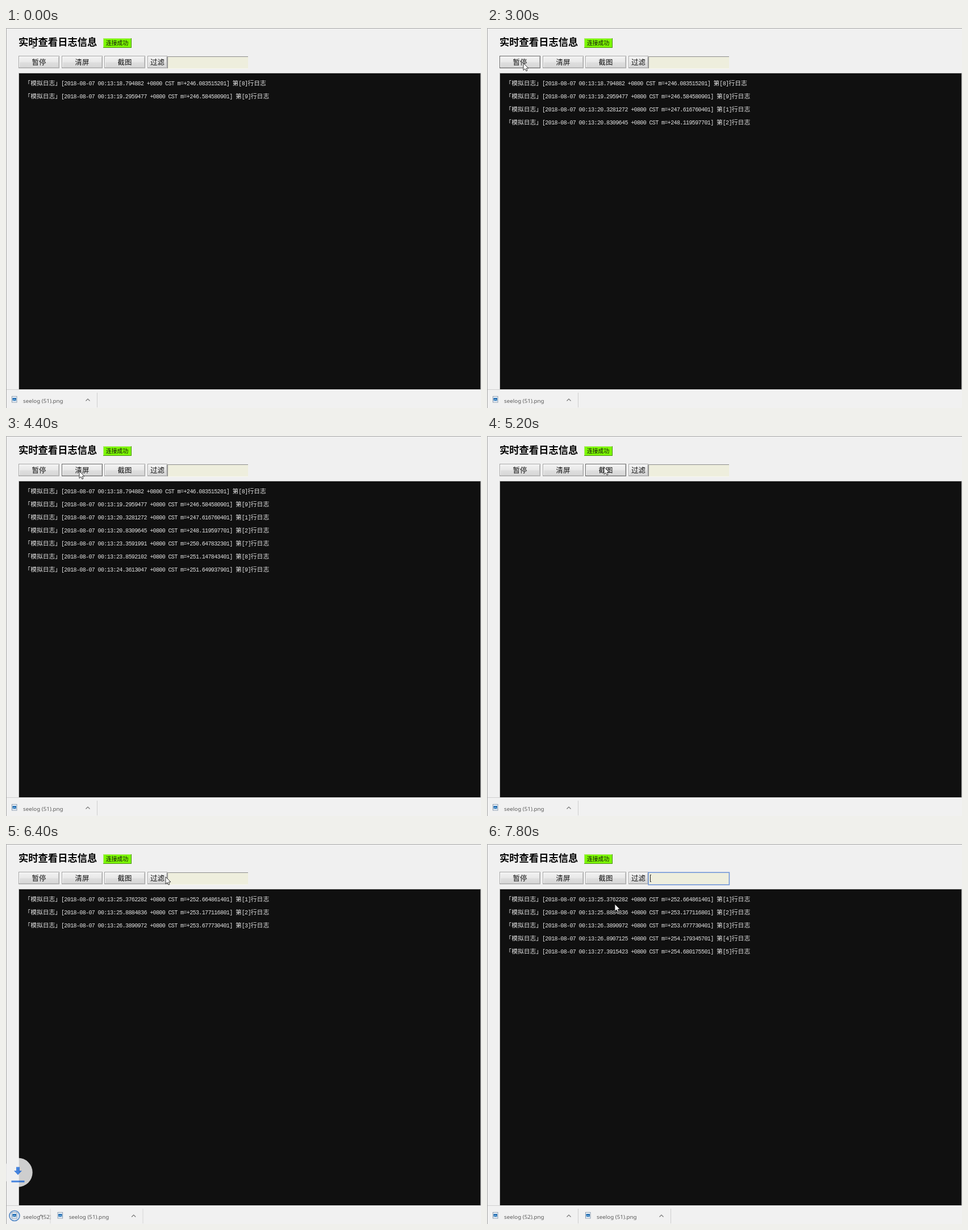
An HTML page that plays this animation: 836x670 px, repeating every 8 s.

```html
<!DOCTYPE html>
<html lang="zh-CN">
<head>
<meta charset="utf-8">
<title>实时查看日志信息</title>
<style>
  html, body { margin: 0; width: 100%; height: 100%; overflow: hidden; background: #f0f0f0; }
  svg { display: block; }
  text { font-family: "Noto Sans CJK SC", "Noto Sans CJK", "Noto Sans CJK JP", sans-serif; fill: #111; }
  .title { font-size: 17.3px; font-weight: 700; fill: #000; }
  .badge { font-size: 9.8px; }
  .label { font-size: 12.4px; text-anchor: middle; }
  .log { font-size: 10.77px; fill: #e4e4e4; }
  .log tspan { font-family: "Liberation Mono", monospace; font-size: 10px; letter-spacing: -.616px; }
  .file { font-family: "Noto Sans", sans-serif; font-size: 9.8px; fill: #5c5c5c; }
</style>
</head>
<body>
<svg id="stage" width="836" height="670" viewBox="0 0 836 670"></svg>
<script>
const LOOP = 8000, STEP = 200, CLEAR = 4600, DOWNLOAD = 6174;

// Clock seconds after 00:13, monotonic reading, line number
const LOGS = [
  ['18.794882', '246.083515201', 8], ['19.2959477', '246.584580901', 9],
  ['20.3281272', '247.616760401', 1], ['20.8309645', '248.119597701', 2],
  ['23.3591991', '250.647832301', 7], ['23.8592102', '251.147843401', 8],
  ['24.3613047', '251.649937901', 9], ['25.3762282', '252.664861401', 1],
  ['25.8884836', '253.177116801', 2], ['26.3890972', '253.677730401', 3],
  ['26.8907125', '254.179345701', 4], ['27.3915423', '254.680175501', 5]
].map(([sec, mono, n]) => ({
  at: (sec - 20) * 1000,
  text: `「模拟日志」[2018-08-07 00:13:${sec} +0800 CST m=+${mono}] 第[${n}]行日志`
}));

// Pointer stops: time, x, y
const PATH = [
  [0, 48, 30], [200, 64, 62], [3400, 64, 62], [4200, 129, 62], [4600, 129, 62], [5200, 206, 55],
  [6000, 206, 55], [6400, 281, 58], [6800, 300, 61], [7200, 300, 61], [7800, 225, 106]
];

const clamp = v => Math.max(0, Math.min(1, v));
const rect = (x, y, w, h, fill, more = '') =>
  `<rect x="${x}" y="${y}" width="${w}" height="${h}" fill="${fill}" ${more}/>`;
const path = (d, stroke, more = 'fill="none"') => `<path d="${d}" stroke="${stroke}" ${more}/>`;
const text = (cls, x, y, s) => `<text class="${cls}" x="${x}" y="${y}">${s}</text>`;

function pointerAt(t) {
  const i = PATH.findIndex(p => p[0] > t);
  if (i < 0) return PATH.at(-1).slice(1);
  const [t0, x0, y0] = PATH[i - 1], [t1, x1, y1] = PATH[i];
  const k = (t - t0) / (t1 - t0), e = k * k * (3 - 2 * k);
  return [x0 + (x1 - x0) * e, y0 + (y1 - y0) * e];
}

function pointer(t, x, y) {
  const beam = t < 200 || (x > 284 && y < 72);
  return `<g transform="translate(${x} ${y})">` + (beam
    ? path('M-2.5-5.5H2.5M0-5.5V5M-2.5 5H2.5', '#333')
    : path('M0 0V12.5L3 9.8 5 14 7 13 5.2 9H9Z', '#222', 'fill="#fff" stroke-width=".9"')) + '</g>';
}

function button(x, w, label, hover, paused) {
  const border = paused ? '#6f93d6' : hover ? '#666' : '#a6a6a6';
  return rect(x + .5, 49.5, w - 1, 21, paused ? '#f00000' : 'url(#face)',
      `stroke="${border}" stroke-width="${paused ? 1.6 : 1}"`) +
    (paused ? '' : path(`M${x + 1.5} 69V50.5H${x + w - 1}`, '#fafafa') +
      path(`M${x + 1} 69.5H${x + w - 1.5}V51`, '#c4c4c4')) +
    text('label', x + w / 2, 64.5, label);
}

function logLines(t) {
  const shown = LOGS.filter(l => l.at <= t && (t < CLEAR || l.at > CLEAR));
  return shown.map((l, i) => text('log', 32.4, 100.8 + 23.07 * i,
    l.text.replace(/[ -~]+/g, s => `<tspan>${s}</tspan>`))).join('');
}

function shelfItem(x, w, name, ring) {
  return `<svg x="${x}" y="638" width="${w + 1}" height="32">` +
    (ring ? `<circle cx="15" cy="17.5" r="9" fill="#dbe6f2" stroke="#5589c4" stroke-width="1.6" opacity="${ring}"/>` : '') +
    rect(10.5, 11.5, 8.5, 10.5, '#fff', 'stroke="#8a9bb0"') +
    rect(11.5, 14, 6.5, 5.5, '#2a72b5') + path('M12 19L14.5 16.5 17.5 19', '#9fd0ee') +
    text('file', 30, 22.7, name) +
    path(`M${w - 19.5} 19.5L${w - 16} 16 ${w - 12.5} 19.5`, '#777', 'fill="none" stroke-width="1.2"') +
    path(`M${w + .5} 5V31`, '#cfcfcf') + '</svg>';
}

function shelf(t) {
  const k = clamp((t - DOWNLOAD) / 800), w = 160 * (1 - (1 - k) ** 2);
  const ring = clamp((7600 - t) / 600);
  return k ? shelfItem(0, w, 'seelog (52).png', ring) + shelfItem(w + 3, 160, 'seelog (51).png')
    : shelfItem(0, 160, 'seelog (51).png');
}

function downloadDrop(t) {
  const k = (t - DOWNLOAD) / 600;
  if (k <= 0 || k >= 1) return '';
  return `<g transform="translate(21 ${559.5 + 52 * k})" opacity="${1 - 4 * (k - .5) ** 2}">` +
    '<circle r="25.7" fill="#f0f0f0" fill-opacity=".91"/>' +
    '<path d="M-3-9.5H3V-3H7L0 4.5-7-3H-3ZM-11.5 14.5H11.5V17.5H-11.5Z" fill="#3b7ddd"/></g>';
}

function filterInput(focused) {
  return rect(284, 50, 142, 22, '#eeeedd') + (focused
    ? rect(284, 50.2, 142.4, 21.6, 'none', 'stroke="#7297d8" stroke-width="1.6"') +
      path('M289 54.5H287.5V66.5H289', '#222')
    : path('M284.5 71V50.5H426', '#8c8c8c') + path('M285 71.5H426', '#f6f6ec'));
}

function scene(t) {
  const [x, y] = pointerAt(t), paused = t >= 1200 && t < 3000;
  const over = left => y > 49 && y < 71 && x > left && x < left + 72;
  return `<defs><linearGradient id="face" x2="0" y2="1">
      <stop stop-color="#f3f3f3"/><stop offset=".5" stop-color="#e8e8e8"/>
      <stop offset=".55" stop-color="#dedede"/><stop offset="1" stop-color="#d6d6d6"/>
    </linearGradient></defs>` +
    rect(0, 0, 836, 670, '#f0f0f0') +
    path('M.5 670V.5H836', '#a5a5a5') +
    text('title', 22, 30.5, '实时查看日志信息') +
    rect(171, 18, 50, 17, '#7cf800') +
    path('M171.5 34V18.5H220', '#b4e878') + path('M171 34.5H220.5V18', '#4b8f10') +
    text('badge', 176, 30.3, '连接成功') +
    button(22, 72, paused ? '已暂停' : '暂停', over(22), paused) +
    button(98, 72, '清屏', over(98)) +
    button(173, 72, '截图', over(173)) +
    button(249, 35, '过滤') +
    filterInput(t >= 7200) +
    rect(22.5, 79.5, 813, 558, '#101010', 'stroke="#c4c4c4"') +
    logLines(t) +
    downloadDrop(t) +
    rect(1, 638, 835, 32, '#f1f1f1') + path('M1 637.5H836', '#d0d0d0') +
    shelf(t) +
    pointer(t, x, y);
}

const stage = document.getElementById('stage');
let last = -1;
function tick() {
  const t = Math.floor(performance.now() % LOOP / STEP) * STEP;
  if (t !== last) stage.innerHTML = scene(last = t);
  requestAnimationFrame(tick);
}
tick();
</script>
</body>
</html>
```
